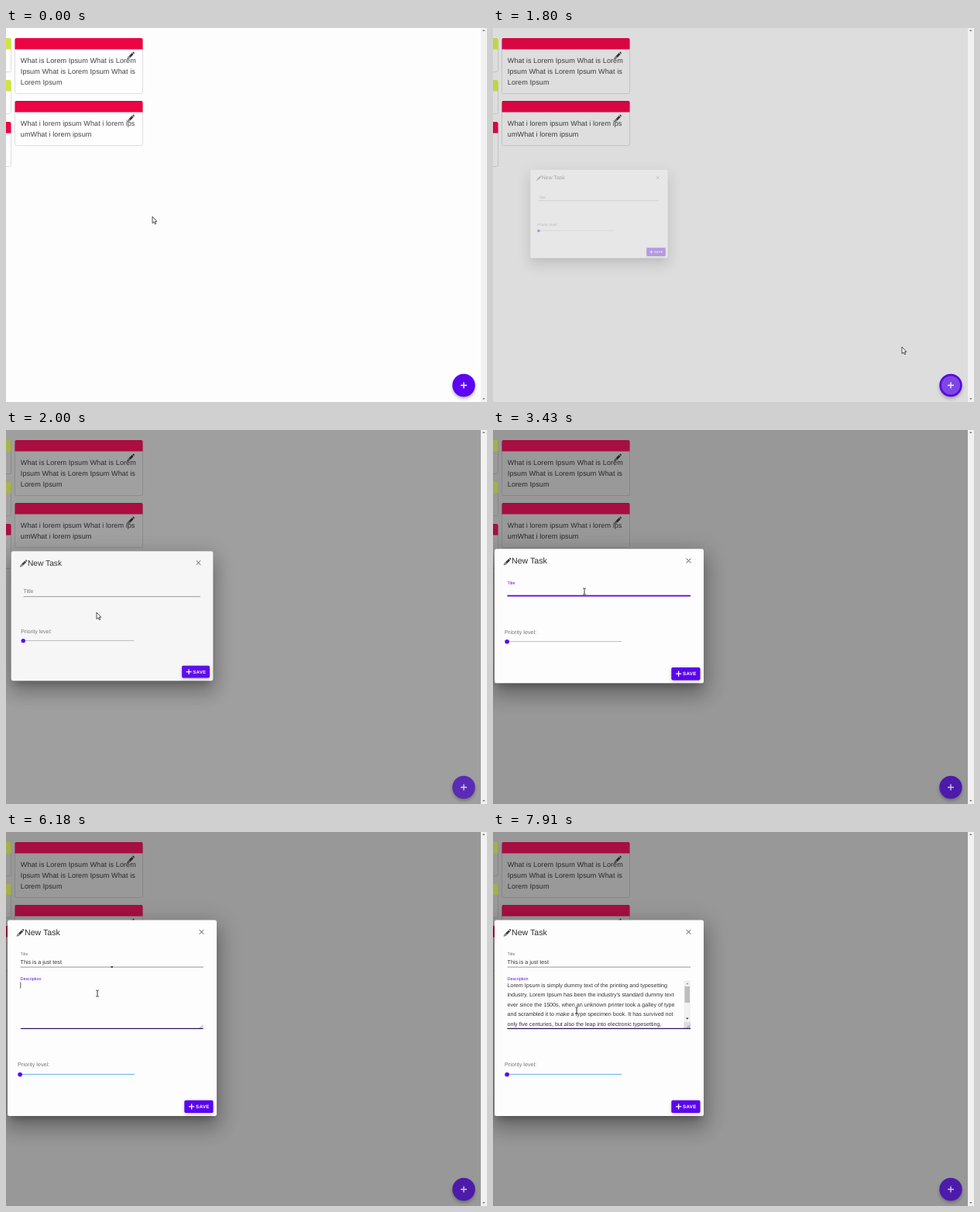
An HTML page for the animation above (8 s loop, 621x482 px).

```html
<!DOCTYPE html>
<html lang="en">
<head>
<meta charset="utf-8">
<title>New task dialog</title>
<style>
  html, body { margin: 0; width: 100%; height: 100%; overflow: hidden; background: #fdfdfd; }
  svg { display: block; width: 621px; height: 482px; }
  text { font-family: "Liberation Sans", Arial, sans-serif; white-space: pre; text-rendering: geometricPrecision; }
  .card { fill: #fff; fill-opacity: .4; stroke: #dedede; stroke-width: 1; }
  .note { font-size: 9.1px; letter-spacing: .06px; fill: #424242; }
  .field { font-size: 7.18px; fill: #333; }
  .muted { fill: #757575; }
  .soft1 { filter: blur(5px); }
  .soft2 { filter: blur(12px); }
  .soft3 { filter: blur(15px); }
  .lift { filter: blur(2.5px); }
</style>
</head>
<body>
<svg viewBox="0 0 621 482">
  <defs>
    <g id="pen">
      <path d="M3 6.2 7.2 2.1 9.2 4 5 8.2z" fill="#3c3c3c"/>
      <path d="M7.8 1.5 8.5.8Q9 .4 9.5.9L10.2 1.7Q10.6 2.2 10.2 2.7L9.7 3.4z" fill="#3c3c3c"/>
      <path d="M2.6 6.7 4.5 8.7 1 10z" fill="#aaa" stroke="#555" stroke-width=".7"/>
    </g>
    <path id="arrow" d="M0 0V8.6L2 6.8 3.4 9.8 4.7 9.2 3.4 6.3H5.8z" fill="#fff" stroke="#222" stroke-width=".8"/>
    <path id="beam" d="M-1.8-4H-.5L0-3.5 .5-4H1.8M0-3.5V3.5M-1.8 4H-.5L0 3.5 .5 4H1.8" fill="none" stroke="#222" stroke-width=".9"/>
  </defs>

  <rect width="621" height="482" fill="#fdfdfd"/>
  <g id="cards"></g>
  <rect id="shade" width="613" height="482" fill="#000"/>
  <g id="bars"></g>

  <ellipse class="lift" cx="591" cy="463.5" rx="14" ry="13.5" opacity=".35"/>
  <circle id="fab" cx="591" cy="460.5" r="14.7"/>
  <circle id="ripple" cx="591" cy="460.5" fill="#fff"/>
  <path id="plus" d="M591 456.5V464.5M587 460.5H595" stroke="#fff" stroke-width="1.4"/>

  <rect x="613" width="8" height="482" fill="#f1f1f1"/>
  <path d="M615 4 616.8 2 618.6 4zM615 477 616.8 479 618.6 477z" fill="#777"/>

  <g id="dialog">
    <g id="shadow">
      <rect class="soft1" x="6.5" width="261" opacity=".24"/>
      <rect class="soft2" x="0" width="274" opacity=".2"/>
      <rect class="soft3" x="-3" width="280" opacity=".16"/>
    </g>
    <rect id="sheet" x="2" width="270" rx="2.5" fill="#fdfdfd"/>

    <g id="upper">
      <use href="#pen" x="13" y="164"/>
      <text x="24" y="172.4" font-size="10.6" fill="#2b2b2b">New Task</text>
      <path d="M249.6 165.6 255.4 171.4M255.4 165.6 249.6 171.4" stroke="#555" stroke-width="1"/>
      <text id="titleLabel" x="18.5">Title</text>
      <text id="titleText" class="field" x="18.5" y="209.4"></text>
      <path d="M18.5 213.8H255" stroke="#8c8c8c" stroke-width=".9"/>
      <path id="titleLine" stroke-width="1.7"/>
    </g>

    <g id="area">
      <text id="descLabel" x="18.5">Description</text>
      <g id="descText"></g>
      <g id="descBar">
        <rect x="246.5" y="191" width="8.5" height="62" fill="#f1f1f1"/>
        <rect x="247.5" y="199" width="6.5" height="21" fill="#bdbdbd"/>
        <path d="M249 196.3 250.8 194.3 252.6 196.3z" fill="#999"/>
        <path d="M249 239.5 250.8 241.5 252.6 239.5z" fill="#333"/>
        <rect x="246.5" y="245" width="8.5" height="8.5" fill="#dcdcdc"/>
      </g>
      <path d="M250 253 254.5 248.8M252.4 253 254.5 251" stroke="#777" stroke-width=".7"/>
      <path d="M18.5 253.5H255" stroke="#666" stroke-width="1"/>
      <path id="descLine" stroke="#2c1560" stroke-width="1.4"/>
    </g>

    <g id="lower">
      <text class="field muted" x="15" y="262.6">Priority level:</text>
      <path id="track" d="M18 272.6H166" stroke-width="1"/>
      <circle cx="18.1" cy="272.8" r="2.8" fill="#5a04f0"/>
      <rect class="lift" x="231" y="308" width="36" height="15" opacity=".3"/>
      <rect x="230.3" y="306" width="37.2" height="16.4" rx="1.8" fill="#5a04f0"/>
      <path d="M239.6 310.6V317.8M236 314.2H243.2" stroke="#fff" stroke-width="1.3"/>
      <text x="245" y="316.4" font-size="6.2" font-weight="bold" letter-spacing=".35" fill="#fff">SAVE</text>
    </g>
    <path id="caret" stroke="#333" stroke-width=".8"/>
  </g>

  <use id="mouse"/>
</svg>
<script>
  const LOOP = 8000, MID = 137, MIDY = 239.5, GROW = 39.7;
  const FOCUS = 2900, EXPAND = 3530, TYPE = 4030, KEY = 80, TAB = 5930, PASTE = 6780;
  const TITLE = 'This is a just test';
  const LOREM = [
    'Lorem Ipsum is simply dummy text of the printing and typesetting',
    "industry. Lorem Ipsum has been the industry's standard dummy text",
    'ever since the 1500s, when an unknown printer took a galley of type',
    'and scrambled it to make a type specimen book. It has survived not',
    'only five centuries, but also the leap into electronic typesetting,'
  ];
  const RED = [[236, 4, 68], [166, 15, 65]];
  const LIME = [[206, 230, 62], [164, 176, 76]];
  const VIOLET = [[92, 5, 245], [76, 27, 170]];
  const CARDS = [
    { x: -158.5, y: 13.5, h: 43, hue: LIME },
    { x: -158.5, y: 67.5, h: 43, hue: LIME },
    { x: -158.5, y: 121.5, h: 57, hue: RED },
    { x: 11.5, y: 13.5, h: 71, hue: RED, lines: [
      'What is Lorem Ipsum What is Lorem', 'Ipsum What is Lorem Ipsum What is', 'Lorem Ipsum'] },
    { x: 11.5, y: 94.5, h: 57, hue: RED, edge: true, lines: [
      'What i lorem ipsum What i lorem ips', 'umWhat i lorem ipsum'] }
  ];
  // time, x, y
  const MOUSE = [[700, 189, 243], [1350, 588, 457], [1600, 588, 457], [1800, 528, 411],
    [2000, 117, 235], [2400, 117, 226], [2850, 118, 208], [7250, 118, 208], [7600, 108, 230]];
  const OPEN = [[1500, 0], [1600, .03], [1700, .12], [1800, .31], [1900, .66], [2000, .93], [2100, 1]];

  const $ = id => document.getElementById(id);
  const clamp = v => Math.max(0, Math.min(1, v));
  const span = (t, start, len) => clamp((t - start) / len);
  const smooth = u => u * u * (3 - 2 * u);
  const mix = (a, b, u) => a + (b - a) * u;
  const tint = (pair, u) => `rgb(${pair[0].map((v, i) => Math.round(mix(v, pair[1][i], u)))})`;

  function set(node, attrs) {
    for (const k in attrs) node.setAttribute(k, attrs[k]);
    return node;
  }

  function add(parent, tag, attrs, text) {
    const node = set(document.createElementNS('http://www.w3.org/2000/svg', tag), attrs);
    if (text) node.textContent = text;
    return parent.appendChild(node);
  }

  function show(id, on) { $(id).style.display = on ? '' : 'none'; }

  function along(keys, t, ease = u => u) {
    if (t <= keys[0][0]) return keys[0].slice(1);
    for (let i = 1; i < keys.length; i++) {
      const [a, b] = [keys[i - 1], keys[i]];
      if (t < b[0]) return a.slice(1).map((v, k) => mix(v, b[k + 1], ease(span(t, a[0], b[0] - a[0]))));
    }
    return keys[keys.length - 1].slice(1);
  }

  for (const c of CARDS) {
    add($('cards'), 'rect', { class: 'card', x: c.x, y: c.y, width: 165, height: c.h, rx: 2 });
    const top = c.y - .5;
    c.bar = add($('bars'), 'path', {
      d: `M${c.x} ${top + 14.5}V${top + 2}q0-2 2-2h161q2 0 2 2v12.5z`
    });
    if (c.edge) add($('bars'), 'path', {
      d: `M${c.x + 1} ${c.y}h163`, stroke: '#6b2038', 'stroke-opacity': .75
    });
    if (!c.lines) continue;
    c.lines.forEach((s, i) => add($('cards'), 'text',
      { class: 'note', x: 18.8, y: c.y + 31.7 + 14 * i }, s));
    add($('cards'), 'use', { href: '#pen', x: 155.5, y: c.y + 16.5 });
  }
  LOREM.forEach((s, i) => add($('descText'), 'text', { class: 'field', x: 18.5, y: 199.7 + 12.5 * i }, s));

  // Floating field label: u = 0 resting, 1 raised
  function label(id, u, low, high, active) {
    set($(id), {
      y: mix(low, high, u),
      'font-size': mix(7.18, 5.4, u),
      fill: active ? '#6408e0' : '#757575'
    });
  }

  function line(id, y, u) {
    const half = 118.25 * u;
    set($(id), { d: `M${136.75 - half} ${y}h${2 * half}` });
  }

  function drawDialog(t, open) {
    show('dialog', open > 0);
    const big = t >= EXPAND, dy = big ? GROW : 0;
    const top = 153.2 - dy, height = 173 + 2 * dy;
    const size = .5 + .5 * open;
    set($('dialog'), {
      opacity: open,
      transform: `translate(${MID} ${MIDY}) scale(${size}) translate(${-MID} ${-MIDY})`
    });
    set($('sheet'), { y: top, height });
    [[7, -4], [15, 2], [6, 5]].forEach(([drop, grow], i) =>
      set($('shadow').children[i], { y: top + drop - grow, height: height + 2 * grow }));
    set($('upper'), { transform: `translate(0 ${-dy})` });
    set($('lower'), { transform: `translate(0 ${dy})` });
    set($('track'), { stroke: big ? '#5aaeea' : '#bdbdbd' });
    show('area', big);

    const onTitle = t >= FOCUS && t < TAB, onDesc = t >= TAB;
    const leave = span(t, TAB, 300);
    label('titleLabel', smooth(span(t, FOCUS, 200)), 209.1, 199.2, onTitle);
    line('titleLine', 213.6, onDesc ? (1 - leave) ** 2.5 : smooth(span(t, FOCUS, 300)));
    set($('titleLine'), { stroke: onDesc ? '#333' : '#6408e0' });
    label('descLabel', smooth(span(t, TAB, 200)), 201.2, 191.2, onDesc);
    line('descLine', 253.4, 1 - (1 - leave) ** 2.5);

    const typed = t < TYPE ? 0 : Math.min(TITLE.length, Math.floor((t - TYPE) / KEY) + 1);
    $('titleText').textContent = TITLE.slice(0, typed);
    const pasted = t >= PASTE;
    show('descText', pasted);
    show('descBar', pasted);

    const since = onDesc ? TAB : typed ? TYPE + (typed - 1) * KEY : FOCUS;
    show('caret', t >= FOCUS && !pasted && (t - since) % 1000 < 500);
    const x = onDesc || !typed ? 18.8 : 18.9 + $('titleText').getComputedTextLength();
    const y = onDesc ? 193.5 : 202.8 - dy;
    set($('caret'), { d: `M${x} ${y}v8` });
  }

  function draw(t) {
    const [open] = along(OPEN, t);
    set($('shade'), { opacity: .4 * open });
    for (const c of CARDS) set(c.bar, { fill: tint(c.hue, open) });
    set($('fab'), { fill: tint(VIOLET, open) });
    set($('plus'), { opacity: 1 - .25 * open });
    set($('ripple'), {
      r: 14.7 * span(t, 1450, 430),
      opacity: .24 * (1 - span(t, 1800, 300))
    });
    drawDialog(t, open);
    const [x, y] = along(MOUSE, t, smooth);
    set($('mouse'), { href: t < 2750 ? '#arrow' : '#beam', transform: `translate(${x} ${y})` });
  }

  function tick() {
    draw(performance.now() % LOOP);
    requestAnimationFrame(tick);
  }
  tick();
</script>
</body>
</html>
```
